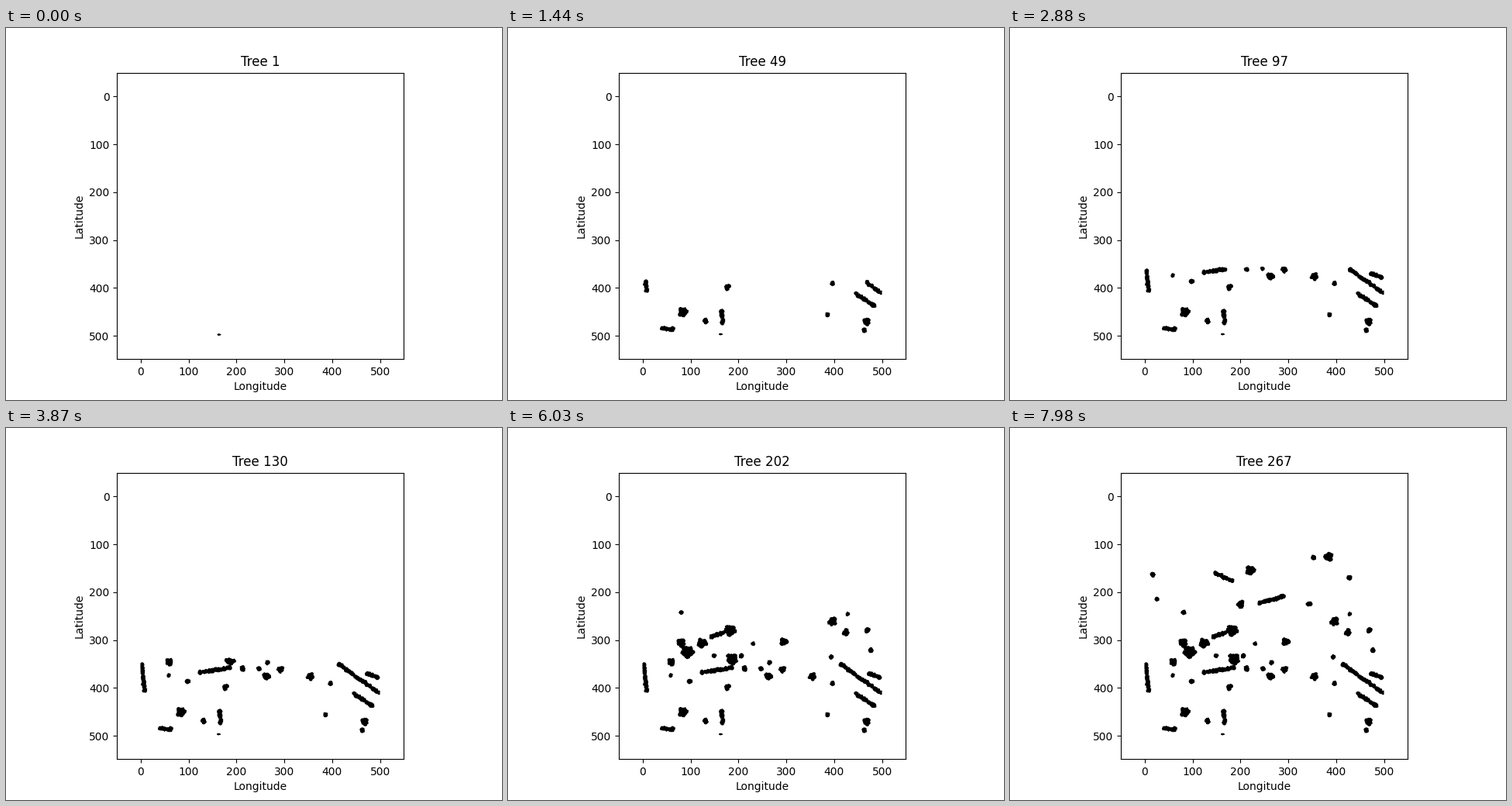
Recreate the animation shown at these times as a matplotlib script. Size 640 by 480 pixels, loop 8000 ms.

```python
import math
import random

import matplotlib.pyplot as plt
import numpy as np
from matplotlib.animation import FuncAnimation
from matplotlib.collections import PolyCollection

LOOP_MS, TICK_MS, TREE_MS = 8000, 20, 30
TREES = 267
SIZE = 499

rng = random.Random(12)

# Main rows: x0, y0, x1, y1
ROWS = [
    (415, 351, 498, 411), (446, 413, 483, 437), (473, 370, 495, 378),
    (3, 352, 8, 404), (165, 448, 167, 474), (40, 485, 62, 487),
    (125, 367, 186, 358), (148, 160, 182, 176), (240, 222, 290, 209),
    (143, 293, 168, 285),
]

# Main groves: x, y, radius
GROVES = [
    (84, 450, 10), (468, 471, 8), (177, 398, 6), (262, 376, 8),
    (354, 376, 8), (60, 346, 8), (292, 361, 7), (93, 325, 13),
    (81, 306, 9), (124, 306, 10), (187, 340, 12), (295, 303, 8),
    (182, 280, 12), (396, 262, 9), (424, 284, 7), (221, 154, 10),
    (384, 126, 9), (200, 225, 8),
]

# The scan moves north: tree number against latitude
SCAN_TREE = [1, 2, 28, 49, 130, 174, 202, TREES]
SCAN_LAT = [495, 490, 412, 383, 337, 291, 238, 112]


def crown(x, y, rx, ry):
    """Ragged outline of one tree, cut at the map's edge."""
    pts = []
    for k in range(11):
        a = 2 * math.pi * k / 11
        s = rng.uniform(0.75, 1.15)
        pts.append((x + rx * s * math.cos(a), y + ry * s * math.sin(a)))
    return np.clip(pts, 0, SIZE)


def row(x0, y0, x1, y1):
    n = round(math.hypot(x1 - x0, y1 - y0) / 6) + 1
    for u in np.linspace(0, 1, n):
        yield (x0 + u * (x1 - x0) + rng.uniform(-1, 1),
               y0 + u * (y1 - y0) + rng.uniform(-1, 1))


def grove(x, y, r):
    n = 1 + round(r * r / 12)
    turn = rng.uniform(0, 2 * math.pi)
    for k in range(n):
        d = (r - 2) * math.sqrt(k / n)
        yield x + d * math.cos(turn + 2.4 * k), y + d * math.sin(turn + 2.4 * k)


def is_free(x, y, spots):
    in_valley = abs(x - 320) < (y - 200) / 4
    return not in_valley and all(math.hypot(x - a, y - b) > 13
                                 for a, b in spots)


def plant():
    spots = [p for r in ROWS for p in row(*r)]
    spots += [p for g in GROVES for p in grove(*g)]
    # Small thickets, as dense as the scan is slow
    while len(spots) < TREES - 1:
        x = rng.uniform(5, 490)
        y = 5 + np.interp(rng.uniform(2, TREES), SCAN_TREE, SCAN_LAT)
        if is_free(x, y, spots):
            spots += grove(x, y, rng.choice([2, 2, 4, 5]))
    trees = [crown(162.5, 497, 3.2, 1.2)]
    for x, y in spots[:TREES - 1]:
        r = rng.uniform(3.9, 5)
        trees.append(crown(x, y, r, r))
    return sorted(trees, key=lambda t: -t[:, 1].min())


trees = plant()
births = np.interp([-t[:, 1].min() for t in trees],
                   [-lat for lat in SCAN_LAT], SCAN_TREE)

fig, ax = plt.subplots(figsize=(6.4, 4.8), dpi=100)
margin = SIZE / 10
ax.set_xlim(-margin, SIZE + margin)
ax.set_ylim(SIZE + margin, -margin)
ax.set_aspect("equal")
ax.set_xlabel("Longitude")
ax.set_ylabel("Latitude")
title = ax.set_title("Tree 1")
forest = ax.add_collection(
    PolyCollection([], facecolors="black", edgecolors="black", linewidths=0.8),
    autolim=False)


def draw(i):
    number = (i * TICK_MS + TICK_MS // 2) // TREE_MS + 1
    shown = np.searchsorted(births, number + 1e-6, side="right")
    forest.set_verts(trees[:shown])
    title.set_text(f"Tree {number}")
    return forest, title


anim = FuncAnimation(fig, draw, frames=LOOP_MS // TICK_MS, interval=TICK_MS,
                     repeat=True, repeat_delay=0)
plt.show()
```
